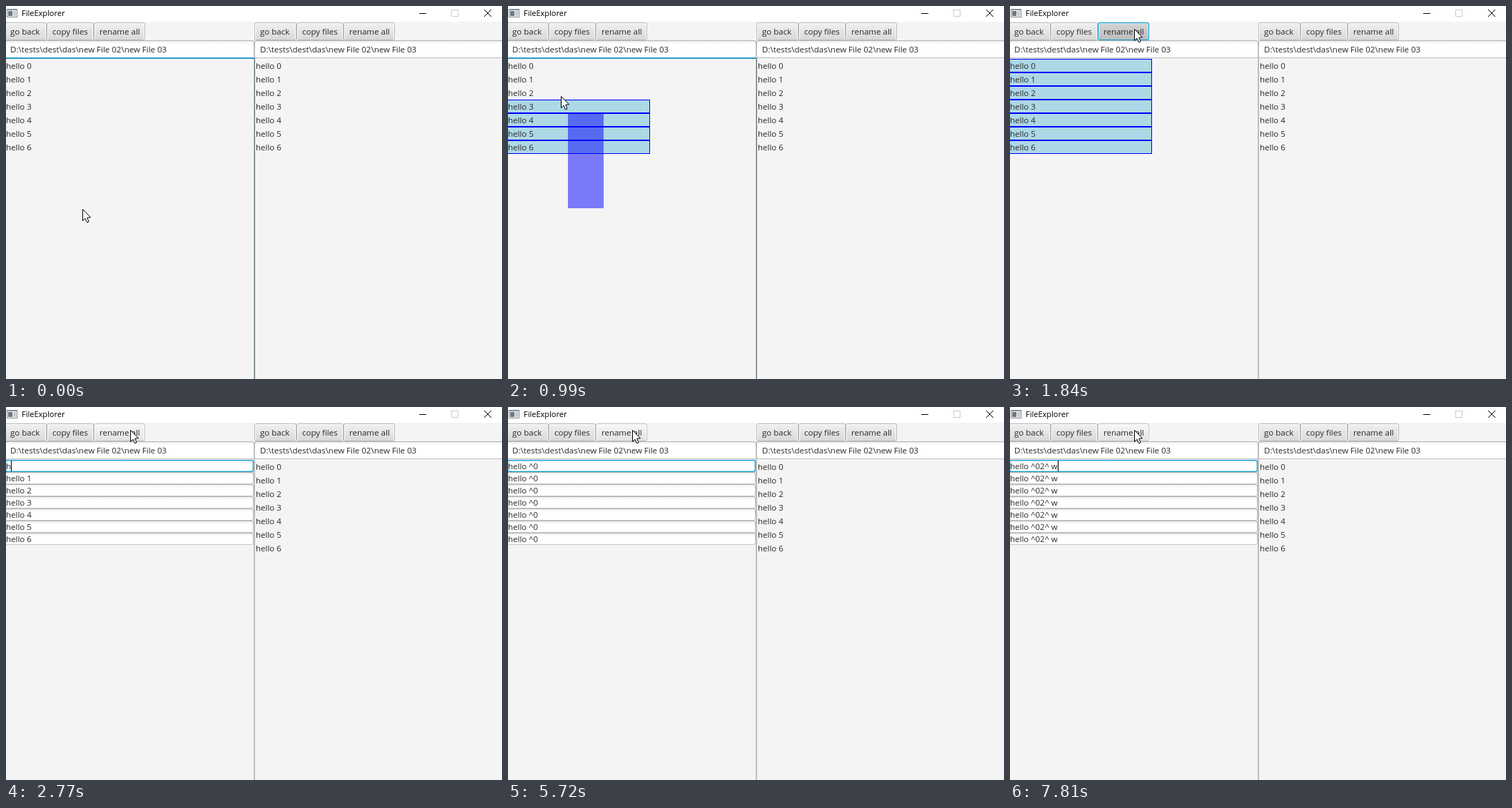
Animation of 695x522 px, one loop 8000 ms. Source, as an HTML page with a canvas:

```html
<!DOCTYPE html>
<html lang="en">
<head>
<meta charset="utf-8">
<title>FileExplorer</title>
<style>
  html, body { margin: 0; width: 100%; height: 100%; overflow: hidden; background: #f4f4f4; }
  canvas { display: block; }
</style>
</head>
<body>
<canvas id="stage" width="695" height="522"></canvas>
<script>
const ctx = document.getElementById('stage').getContext('2d');
const LOOP = 8000, PANE = 350, BLUE = '#039ed3', INK = '#282828';
const PRESS = 1760, RENAME = 1910;
const PATH = 'D:\\tests\\dest\\das\\new File 02\\new File 03';
const NAMES = Array.from({ length: 7 }, (_, i) => 'hello ' + i);

// time, pointer x, y, then the dragged corner while selecting
const POINTER = [
  [0, 107, 284], [610, 118, 284], [690, 132, 283], [760, 134, 281],
  [840, 122, 250, 130, 268], [910, 98, 185, 108, 212], [990, 74, 126, 84, 150],
  [1070, 60, 98, 64, 107], [1140, 53, 80, 54, 84], [1220, 51, 73, 50, 73],
  [1370, 95, 58], [1450, 172, 40], [1530, 198, 33], [1680, 178, 32], [1760, 174, 32]
];
const DRAG_START = [134, 283];

// time, typed text, caret visible
const TYPING = [
  [1910, null, true], [2370, null, false], [2770, 'h', true], [2840, 'he', true],
  [3010, 'hel', true], [3160, 'hell', true], [3390, 'hello', true], [3850, 'hello', false],
  [3930, 'hello ', true], [4480, 'hello ', false], [4710, 'hello ^', true],
  [5170, 'hello ^', false], [5250, 'hello ^0', true], [5720, 'hello ^0', false],
  [5870, 'hello ^02', true], [6330, 'hello ^02', false], [6880, 'hello ^02', true],
  [7200, 'hello ^02^', true], [7660, 'hello ^02^ ', true], [7810, 'hello ^02^ w', true]
];

const at = (keys, t) => keys.findLast(key => key[0] <= t);

function rect(x, y, w, h, fill) {
  ctx.fillStyle = fill;
  ctx.fillRect(x, y, w, h);
}

function round(x, y, w, h, r, fill) {
  ctx.fillStyle = fill;
  ctx.beginPath();
  ctx.roundRect(x, y, w, h, r);
  ctx.fill();
}

function text(str, x, y, size = 11.5, fill = INK) {
  ctx.font = `${size}px "Open Sans", sans-serif`;
  ctx.fillStyle = fill;
  ctx.fillText(str, x, y);
}

function line(points, color) {
  ctx.strokeStyle = color;
  ctx.lineWidth = 1;
  ctx.beginPath();
  points.forEach(([x, y]) => ctx.lineTo(x, y));
  ctx.stroke();
}

function fade(y, h, from, to) {
  const g = ctx.createLinearGradient(0, y, 0, y + h);
  g.addColorStop(0, from);
  g.addColorStop(1, to);
  return g;
}

function titleBar() {
  rect(0, 0, 695, 22, '#fff');
  rect(1, 4, 15, 12, '#8b8f94');
  rect(2, 6, 13, 9, '#f2f4f5');
  rect(3, 7, 6, 7, '#6d7a84');
  rect(10, 7, 4, 7, '#c3cad0');
  text('FileExplorer', 22, 14, 11, '#000');
  rect(579, 10, 10, 1, '#000');
  ctx.strokeStyle = '#ccc';
  ctx.lineWidth = 1;
  ctx.strokeRect(624.5, 5.5, 9, 9);
  line([[670, 5], [680, 15]], '#000');
  line([[680, 5], [670, 15]], '#000');
}

const BUTTON = {
  normal: ['#bababa', '#fdfdfd', '#efefef', '#d9d9d9'],
  hover: ['#c0c0c0', '#fff', '#f6f6f6', '#e2e2e2'],
  armed: [BLUE, '#d8e6ec', '#d3d3d3', '#bdbdbd']
};

function button(label, x, w, state = 'normal') {
  const [border, shine, top, bottom] = BUTTON[state];
  round(x, 23, w, 25, 3, border);
  round(x + 1, 24, w - 2, 23, 2, shine);
  round(x + 2, 25, w - 4, 22, 1.5, fade(25, 22, top, bottom));
  text(label, x + 8, 40);
}

function field(x, y, w, h, focused) {
  round(x, y, w, h, 3, focused ? BLUE : fade(y, h, '#b4b4b4', '#c8c8c8'));
  if (focused) round(x + 1, y + 1, w - 2, h - 2, 2, '#7cc9e4');
  const inset = focused ? 1.5 : 1;
  round(x + inset, y + inset, w - 2 * inset, h - 2 * inset, 2, fade(y + 1, 4, '#eee', '#fff'));
}

function toolbar(x, renameState) {
  button('go back', x - 2, 59);
  button('copy files', x + 57, 66);
  button('rename all', x + 123, 72, renameState);
  field(x - 2, 48, 350, 25, false);
  text(PATH, x + 6, 65);
}

function paneBorders(focused) {
  rect(348, 72, 347, 1, '#bdbdbd');
  rect(347, 73, 1, 449, focused ? '#b4bdc1' : '#c4c4c4');
  rect(348, 73, 1, 449, focused ? '#66747a' : '#b8b8b8');
  if (focused) rect(0, 72, 348, 2, '#2a9cc8');
  else rect(0, 72, 348, 1, '#bdbdbd');
}

function list(x, selectedFrom) {
  NAMES.forEach((name, i) => {
    const y = 74 + 19 * i;
    if (y + 19 >= selectedFrom) {
      rect(x - 1, y, 200, 19, '#00f');
      rect(x, y + 1, 198, 17, '#add8e6');
    }
    text(name, x, y + 14);
  });
}

function renameFields(t) {
  const [, typed, caret] = at(TYPING, t);
  NAMES.forEach((name, i) => {
    const y = 74 + 17 * i;
    field(-1, y, 348, 17, i === 0);
    // the other rows follow the first one a moment later
    const value = typed === null || (i > 0 && t < 2840) ? name : typed;
    text(value, 0, y + 13);
    if (i === 0 && caret) rect(Math.round(ctx.measureText(value).width), y + 1, 1, 15, '#000');
  });
}

function pointer(x, y) {
  ctx.save();
  ctx.translate(x + .5, y + .5);
  ctx.beginPath();
  [[0, 0], [0, 16], [3.5, 12.8], [6, 18.3], [8.5, 17.3], [6.2, 11.7], [11, 11.3]]
    .forEach(([px, py]) => ctx.lineTo(px, py));
  ctx.closePath();
  ctx.fillStyle = '#fff';
  ctx.fill();
  ctx.strokeStyle = '#000';
  ctx.lineWidth = 1;
  ctx.stroke();
  ctx.restore();
}

function draw(t) {
  const [, px, py, dragX, dragY] = at(POINTER, t);
  const renameState = t < 1680 ? 'normal' : t >= PRESS && t < RENAME ? 'armed' : 'hover';

  rect(0, 0, 695, 522, '#f4f4f4');
  titleBar();
  toolbar(0, renameState);
  toolbar(PANE);
  paneBorders(t < PRESS);

  list(PANE, Infinity);
  if (t < RENAME) list(0, dragY ?? (t >= 1370 ? 0 : Infinity));
  else renameFields(t);

  if (dragX !== undefined) {
    rect(dragX, dragY, DRAG_START[0] - dragX, DRAG_START[1] - dragY, 'rgba(0, 0, 255, .5)');
  }
  pointer(px, py);
}

function tick() {
  draw(performance.now() % LOOP);
  requestAnimationFrame(tick);
}
tick();
</script>
</body>
</html>
```
